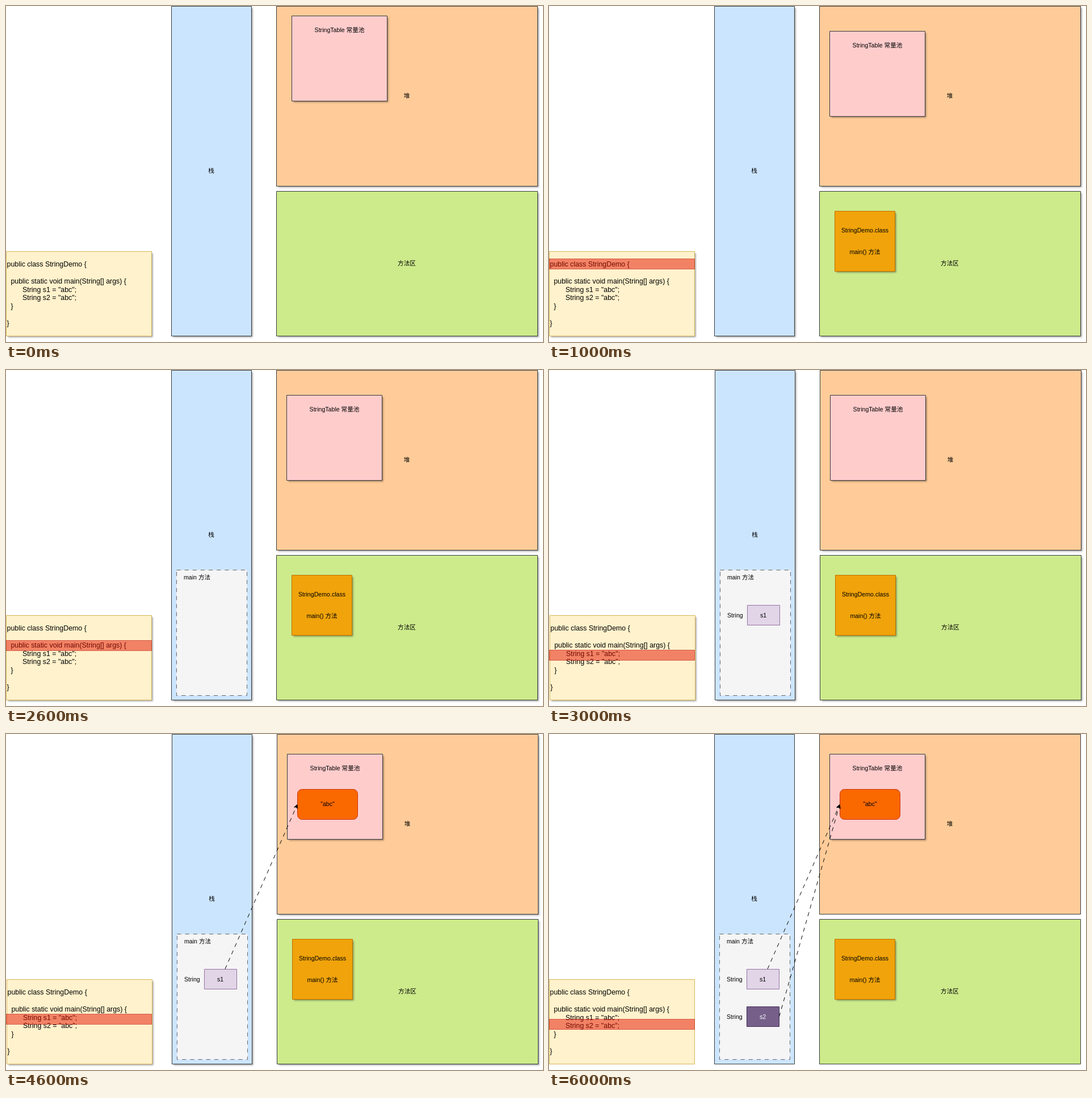
An HTML page with a canvas for the animation above (7000 ms loop, 946x592 px).

```html
<!DOCTYPE html>
<html lang="zh">
<head>
<meta charset="utf-8">
<style>
  html, body { margin: 0; width: 100%; height: 100%; overflow: hidden; background: #fff; }
  canvas { display: block; }
</style>
</head>
<body>
<canvas id="stage" width="946" height="592"></canvas>
<script>
const ctx = document.getElementById('stage').getContext('2d');
const SCALE = 0.885;
const DASH = [8 * SCALE, 8 * SCALE];
const FAMILY = '"Liberation Sans", Arial, "Noto Sans CJK SC", "Noto Sans CJK", sans-serif';
const INK = '#36393d';
const CODE = [
  'public class StringDemo {',
  '',
  '  public static void main(String[] args) {',
  '        String s1 = "abc";',
  '        String s2 = "abc";',
  '  }',
  '',
  '}'
];

// Each step lasts one second; bar is the top of the highlighted code line.
const STEPS = [
  { pool: [503.5, 17.5] },
  { pool: [494.5, 44.5], bar: 445.5, loaded: true },
  { pool: [494.5, 44.5], bar: 476.5, loaded: true, stack: true },
  { pool: [494.5, 44.5], bar: 493.5, loaded: true, stack: true, vars: 1, shift: 1 },
  { pool: [494.5, 35.5], bar: 493.5, loaded: true, stack: true, vars: 1, links: 1, shift: 1 },
  { pool: [494.5, 35.5], bar: 502.5, loaded: true, stack: true, vars: 2, links: 1, flat: true },
  { pool: [494.5, 35.5], bar: 502.5, loaded: true, stack: true, vars: 2, links: 2, flat: true }
];

function box(x, y, w, h, fill, stroke, { shadow = false, radius = 0, dash = [] } = {}) {
  ctx.save();
  ctx.beginPath();
  if (radius) ctx.roundRect(x, y, w, h, radius);
  else ctx.rect(x, y, w, h);
  ctx.fillStyle = fill;
  ctx.strokeStyle = stroke;
  if (shadow) {
    ctx.shadowColor = 'rgba(0,0,0,0.4)';
    ctx.shadowOffsetX = ctx.shadowOffsetY = 2;
    ctx.shadowBlur = 3;
  }
  ctx.fill();
  ctx.shadowColor = 'transparent';
  ctx.setLineDash(dash);
  ctx.stroke();
  ctx.restore();
}

function text(str, x, y, { align = 'center', size = 12, color = '#000' } = {}) {
  ctx.font = `${size * SCALE}px ${FAMILY}`;
  ctx.textAlign = align;
  ctx.fillStyle = color;
  ctx.fillText(str, x, y);
}

function arrow(x1, y1, x2, y2) {
  const len = Math.hypot(x2 - x1, y2 - y1);
  const head = 7 * SCALE;
  const ux = (x2 - x1) / len * head, uy = (y2 - y1) / len * head;
  const nx = x2 - ux * 0.75, ny = y2 - uy * 0.75;
  ctx.strokeStyle = ctx.fillStyle = '#000';
  ctx.setLineDash(DASH);
  ctx.beginPath();
  ctx.moveTo(x1, y1);
  ctx.lineTo(nx, ny);
  ctx.stroke();
  ctx.setLineDash([]);
  ctx.beginPath();
  ctx.moveTo(x2, y2);
  ctx.lineTo(x2 - ux - uy / 2, y2 - uy + ux / 2);
  ctx.lineTo(nx, ny);
  ctx.lineTo(x2 - ux + uy / 2, y2 - uy - ux / 2);
  ctx.closePath();
  ctx.fill();
  ctx.stroke();
}

function variable(name, y, fill, stroke, color) {
  text('String', 313, y + 21, { align: 'left' });
  box(348.5, y, 57, 35, fill, stroke);
  text(name, 376.5, y + 21, { color });
}

function draw(step) {
  const shadow = !step.flat;
  const [px, py] = step.pool;
  ctx.fillStyle = '#fff';
  ctx.fillRect(0, 0, 946, 592);
  ctx.lineWidth = 1;
  ctx.save();
  ctx.translate(step.shift || 0, 0);

  box(291.5, 0.5, 141, 581, '#cce5ff', INK, { shadow });
  text('栈', 361.5, 294);
  box(476.5, 0.5, 460, 317, '#ffcc99', INK, { shadow });
  text('堆', 706, 162);
  box(476.5, 326.5, 460, 255, '#cdeb8b', INK, { shadow });
  text('方法区', 706, 457);
  box(0.5, 432.5, 256, 149, '#fff2cc', '#d6b656', { shadow });
  CODE.forEach((line, i) => text(line, 1.5, 459 + i * 14.87, { align: 'left', size: 14 }));

  box(px, py, 168, 150, '#ffcccc', INK, { shadow: true });
  text('StringTable 常量池', px + 84, py + 28);

  if (step.loaded) {
    box(503.5, 361.5, 106, 106, '#f0a30a', '#bd7000', { shadow: true });
    text('StringDemo.class', 556.5, 399);
    text('main() 方法', 556.5, 437);
  }
  if (step.stack) {
    box(300.5, 352.5, 124, 221, '#f5f5f5', '#666', { dash: DASH });
    text('main 方法', 313, 369, { align: 'left' });
  }
  if (step.vars > 0) variable('s1', 414.5, '#e1d5e7', '#9673a6', '#000');
  if (step.vars > 1) variable('s2', 480.5, '#76608a', '#432d57', '#fff');
  if (step.links) {
    box(512.5, 97.5, 106, 53, '#fa6800', '#c73500', { radius: 8 });
    text('"abc"', 565.5, 127);
    arrow(385, 414, 512, 124.5);
  }
  if (step.links > 1) arrow(405.5, 498, 512, 124.5);
  ctx.restore();

  if (step.bar) {
    ctx.globalAlpha = 0.5;
    box(0.5, step.bar, 256, 18, '#e51400', '#b20000');
    ctx.globalAlpha = 1;
  }
}

const start = performance.now();
function tick() {
  const elapsed = performance.now() - start;
  draw(STEPS[Math.floor(elapsed / 1000) % STEPS.length]);
  requestAnimationFrame(tick);
}
tick();
</script>
</body>
</html>
```
